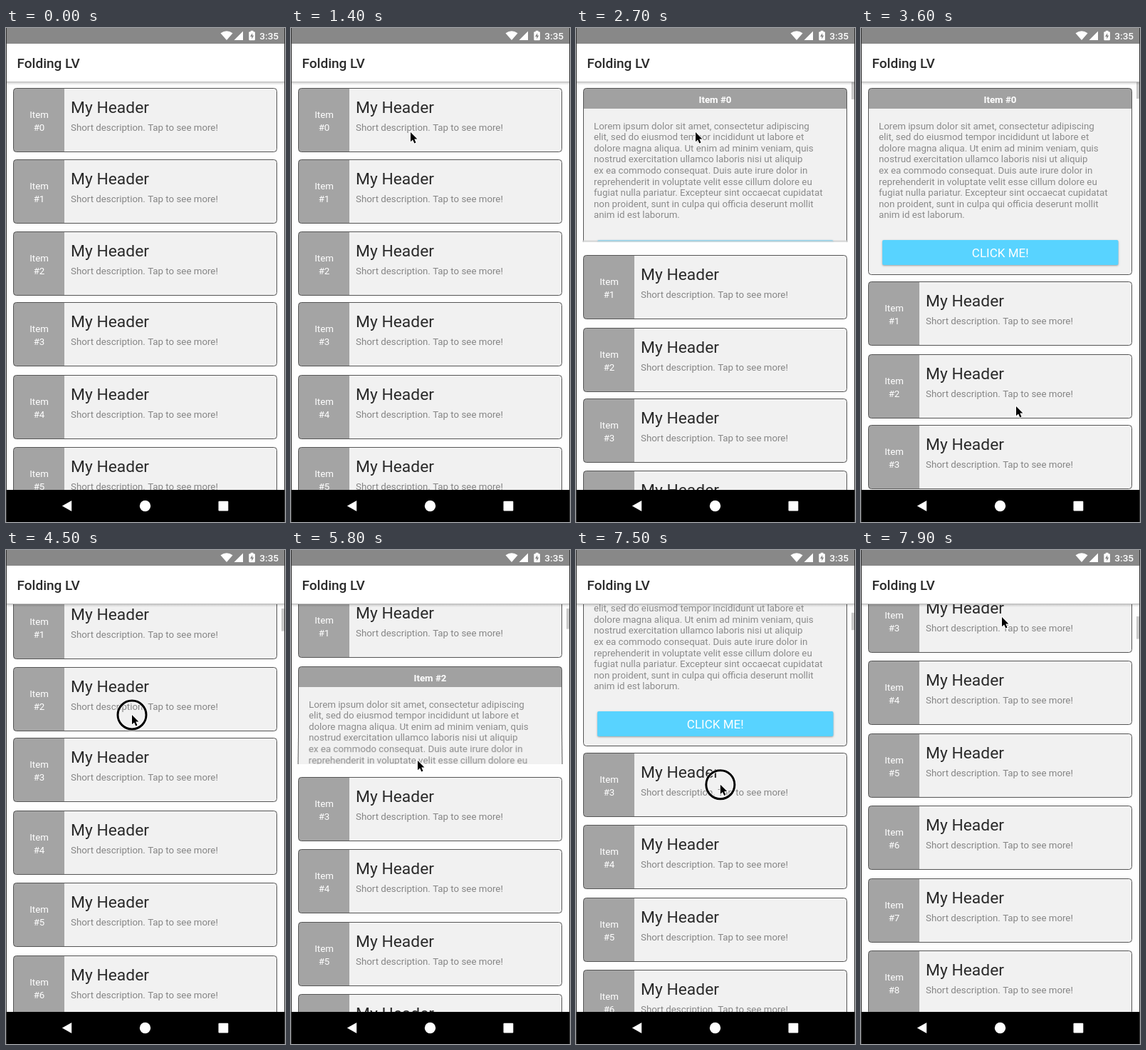
An HTML page with a canvas that plays this animation: 392x692 px, repeating every 8000 ms.

```html
<!DOCTYPE html>
<html lang="en">
<head>
<meta charset="utf-8">
<title>Folding list</title>
<style>
html, body { margin: 0; width: 100%; height: 100%; overflow: hidden; background: #fff; }
canvas { display: block; width: 392px; height: 692px; }
</style>
</head>
<body>
<canvas id="stage"></canvas>
<script>
const W = 392, H = 692, LOOP = 8000, STEP = 100;
const BAR = 76, NAV = 647;
const OPEN = 261.5, DEPTH = 770;
const PARTS = [0, 90, 180, 220.75, OPEN];
const UNFOLD = 1350;
const OPENINGS = { 0: 1663, 2: 5445 };
const FONT = 'Roboto, sans-serif';
const LOREM = [
  'Lorem ipsum dolor sit amet, consectetur adipiscing',
  'elit, sed do eiusmod tempor incididunt ut labore et',
  'dolore magna aliqua. Ut enim ad minim veniam, quis',
  'nostrud exercitation ullamco laboris nisi ut aliquip',
  'ex ea commodo consequat. Duis aute irure dolor in',
  'reprehenderit in voluptate velit esse cillum dolore eu',
  'fugiat nulla pariatur. Excepteur sint occaecat cupidatat',
  'non proident, sunt in culpa qui officia deserunt mollit',
  'anim id est laborum.'
];

// time, x, y
const POINTER = [
  [100, 376, 640], [900, 178, 162], [1000, 168, 146], [2900, 168, 146],
  [3500, 218, 530], [3700, 218, 530], [4500, 177, 231], [4700, 177, 231],
  [5100, 178, 295], [6850, 178, 295], [7100, 206, 481], [7200, 206, 481],
  [7900, 198, 94]
];
const SCROLL = [[3700, 0], [4500, 292.5], [4600, 292.5], [4700, 294], [7200, 294], [7900, 673.5]];
const PRESSES = [[1300, 1400], [3700, 4700], [5100, 5300], [7300, 7900]];

const dpr = window.devicePixelRatio || 1;

function makeLayer(canvas, w, h) {
  canvas.width = Math.round(w * dpr);
  canvas.height = Math.round(h * dpr);
  const g = canvas.getContext('2d');
  g.scale(dpr, dpr);
  return g;
}

const ctx = makeLayer(document.getElementById('stage'), W, H);
const faceLayer = makeLayer(document.createElement('canvas'), W, 264);
const detailLayer = makeLayer(document.createElement('canvas'), W, 264);
const backLayer = makeLayer(document.createElement('canvas'), W, 264);
backLayer.fillStyle = '#d4d5d6';
backLayer.fillRect(10, 0, 371, 264);

const clamp = (v, a = 0, b = 1) => Math.min(b, Math.max(a, v));
const smooth = u => u * u * (3 - 2 * u);

function track(keys, t) {
  if (t <= keys[0][0]) return keys[0].slice(1);
  for (let i = 1; i < keys.length; i++) {
    const a = keys[i - 1], b = keys[i];
    if (t <= b[0]) {
      const u = smooth((t - a[0]) / (b[0] - a[0]));
      return a.slice(1).map((v, k) => v + (b[k + 1] - v) * u);
    }
  }
  return keys[keys.length - 1].slice(1);
}

function label(g, text, x, y, size, color, align = 'left', weight = 400) {
  g.font = `${weight} ${size}px ${FONT}`;
  g.fillStyle = color;
  g.textAlign = align;
  g.fillText(text, x, y);
}

function box(g, x, y, w, h, r, fill, stroke) {
  g.beginPath();
  g.roundRect(x, y, w, h, r);
  if (fill) { g.fillStyle = fill; g.fill(); }
  if (stroke) { g.strokeStyle = stroke; g.lineWidth = 1; g.stroke(); }
}

function poly(g, points, fill) {
  g.beginPath();
  points.forEach(([x, y]) => g.lineTo(x, y));
  g.closePath();
  g.fillStyle = fill;
  g.fill();
}

function drawFace(g, n, y) {
  box(g, 10.5, y + 0.5, 370, 89, 4, '#f1f1f1');
  box(g, 10.5, y + 0.5, 71.5, 89, [4, 0, 0, 4], '#a4a4a4');
  box(g, 10.5, y + 0.5, 370, 89, 4, null, '#555');
  label(g, 'Item', 46.5, y + 41.8, 13.3, '#fff', 'center');
  label(g, '#' + n, 46.5, y + 60, 13.3, '#fff', 'center');
  label(g, 'My Header', 91, y + 35, 22.85, '#2a2a2a');
  label(g, 'Short description. Tap to see more!', 91, y + 60, 13.3, '#858585');
}

function drawDetail(g, n, y) {
  box(g, 10.5, y + 0.5, 370, 261, 4, '#f1f1f1');
  box(g, 10.5, y + 0.5, 370, 28.5, [4, 4, 0, 0], '#a1a1a1');
  box(g, 10.5, y + 0.5, 370, 261, 4, null, '#555');
  label(g, 'Item #' + n, 195.5, y + 20.5, 13.3, '#fff', 'center', 700);
  LOREM.forEach((line, i) => label(g, line, 25, y + 57.8 + i * 15.55, 13.3, '#8a8a8a'));
  g.save();
  g.shadowColor = 'rgba(0,0,0,.35)';
  g.shadowBlur = 2.5 * dpr;
  g.shadowOffsetY = 1 * dpr;
  box(g, 30, y + 213, 331.5, 35, 2, '#58d3ff');
  g.restore();
  label(g, 'CLICK ME!', 195.7, y + 237, 17, '#fff', 'center');
}

// Rows y0..y1 of a layer, turned about the row `hinge` towards the viewer.
function flap(layer, top, y0, y1, hinge, angle) {
  const sin = Math.sin(angle), cos = Math.cos(angle);
  const project = y => {
    const k = 1 / (1 - Math.abs(y - hinge) * sin / DEPTH);
    return [top + hinge + (y - hinge) * cos * k, k];
  };
  for (let y = y0; y < y1; y++) {
    const h = Math.min(1, y1 - y);
    const [a, k] = project(y), [b] = project(y + h);
    ctx.drawImage(layer.canvas, 0, y * dpr, W * dpr, h * dpr,
      W / 2 - W / 2 * k, a, W * k, b - a + 0.15);
  }
}

function drawUnfolding(n, top, height, p) {
  for (const g of [faceLayer, detailLayer]) g.clearRect(0, 0, W, 264);
  drawFace(faceLayer, n, 0);
  drawDetail(detailLayer, n, 0);

  const stage = Math.min(5, Math.floor(p * 6));
  const part = Math.floor((stage + 1) / 2);
  const rising = stage % 2 === 0;
  const flat = rising ? PARTS[part + 1] : PARTS[part];
  const turn = (1 - (1 - p * 6 + stage) ** (rising ? 2.4 : 4)) * Math.PI / 2;

  ctx.save();
  ctx.beginPath();
  ctx.rect(9, top, 373, height - 9);
  ctx.clip();
  ctx.drawImage(detailLayer.canvas, 0, 0, W * dpr, flat * dpr, 0, top, W, flat);
  if (rising) {
    const cover = part === 0 ? 90 : PARTS[part + 2] - PARTS[part + 1];
    flap(part === 0 ? faceLayer : backLayer, top, flat - cover, flat, flat, turn);
  } else {
    const angle = Math.PI / 2 - turn, end = PARTS[part + 1];
    flap(detailLayer, top, flat, end, flat, angle);
    if (part < 3) flap(backLayer, top, end - (PARTS[part + 2] - end), end, flat, angle);
  }
  ctx.restore();
}

const progress = (n, t) => n in OPENINGS ? clamp((t - OPENINGS[n]) / UNFOLD) : 0;

function cellHeight(p) {
  if (p >= 1) return OPEN;
  const i = Math.floor(p * 3), u = p * 3 - i;
  return PARTS[i + 1] + (PARTS[i + 2] - PARTS[i + 1]) * u * u;
}

function drawList(t) {
  const [scroll] = track(SCROLL, t);
  let y = 84.4 - scroll, first = 0, shown = 0;
  ctx.save();
  ctx.beginPath();
  ctx.rect(0, BAR, W, NAV - BAR);
  ctx.clip();
  for (let n = 0; y < NAV; n++) {
    const p = progress(n, t), h = cellHeight(p), top = Math.round(y);
    if (y + h > BAR) {
      if (p === 0) drawFace(ctx, n, top);
      else if (p === 1) drawDetail(ctx, n, top);
      else drawUnfolding(n, top, h, p);
    }
    const slot = h + (n === 0 || n === 2 ? 9.3 : 11.4);
    const above = clamp((BAR - y) / slot);
    first += above;
    shown += 1 - above - clamp((y + slot - NAV) / slot);
    y += slot;
  }
  drawScrollbar(t, first, shown);
  ctx.restore();
}

function drawScrollbar(t, first, shown) {
  if (t < 1700) return;
  ctx.globalAlpha = t >= 5600 ? 1 : clamp((5500 - t) / 300);
  ctx.fillStyle = '#c9c9c9';
  ctx.fillRect(387, BAR + first * 5.3, 4, Math.max(23, shown * 5.6));
  ctx.globalAlpha = 1;
}

function drawStatus() {
  ctx.fillStyle = '#888';
  ctx.fillRect(0, 0, W, 22);
  ctx.fillStyle = '#fff';
  ctx.beginPath();
  ctx.moveTo(310, 17);
  ctx.lineTo(301.5, 7.3);
  ctx.quadraticCurveTo(310, 1, 318.5, 7.3);
  ctx.closePath();
  ctx.fill();
  poly(ctx, [[333, 4.5], [333, 17], [320.5, 17]], '#fff');
  box(ctx, 341.3, 5.2, 8.6, 12, 1, '#fff');
  ctx.fillRect(343.7, 3.8, 3.8, 2);
  poly(ctx, [[346.2, 7], [343, 12], [345.2, 12], [345.2, 15.6], [348.3, 10.6], [346.2, 10.6]], '#888');
  label(ctx, '3:35', 356.3, 16, 13.6, '#fff', 'left', 500);
}

function drawChrome() {
  const shade = ctx.createLinearGradient(0, BAR - 1, 0, BAR + 4);
  shade.addColorStop(0, 'rgba(0,0,0,.28)');
  shade.addColorStop(0.4, 'rgba(0,0,0,.12)');
  shade.addColorStop(1, 'rgba(0,0,0,0)');
  ctx.fillStyle = shade;
  ctx.fillRect(0, BAR - 1, W, 5);
  ctx.fillStyle = '#fff';
  ctx.fillRect(0, 22, W, BAR - 23);
  drawStatus();
  label(ctx, 'Folding LV', 15.5, 55.6, 19, '#2a2a2a', 'left', 500);

  ctx.fillStyle = '#000';
  ctx.fillRect(0, NAV, W, H - NAV);
  poly(ctx, [[78.8, 669.5], [92.2, 662], [92.2, 677]], '#fff');
  ctx.beginPath();
  ctx.arc(195.5, 669.5, 7.7, 0, Math.PI * 2);
  ctx.fill();
  box(ctx, 298.5, 662.8, 13.8, 13.8, 1, '#fff');

  ctx.fillStyle = '#333';
  ctx.fillRect(0, 0, 1, H);
  ctx.fillRect(W - 1, 0, 1, H);
}

function drawPointer(t) {
  if (t < 100) return;
  const [x, y] = track(POINTER, t);
  if (PRESSES.some(([a, b]) => t >= a && t < b)) {
    ctx.beginPath();
    ctx.arc(x, y, 20, 0, Math.PI * 2);
    ctx.strokeStyle = 'rgba(255,255,255,.7)';
    ctx.lineWidth = 5;
    ctx.stroke();
    ctx.strokeStyle = '#000';
    ctx.lineWidth = 3;
    ctx.stroke();
  }
  ctx.save();
  ctx.translate(x, y);
  ctx.lineJoin = 'round';
  const arrow = [[0, 0], [0, 13.2], [3.1, 10.4], [5.3, 15.4], [7.5, 14.4], [5.3, 9.5], [9.4, 9.4]];
  poly(ctx, arrow, '#000');
  ctx.strokeStyle = '#fff';
  ctx.lineWidth = 2;
  ctx.stroke();
  poly(ctx, arrow, '#000');
  ctx.restore();
}

function draw(t) {
  ctx.fillStyle = '#fefefe';
  ctx.fillRect(0, 0, W, H);
  drawList(t);
  drawChrome();
  drawPointer(t);
}

const start = performance.now();
function tick() {
  const t = (performance.now() - start) % LOOP;
  draw(Math.floor(t / STEP) * STEP);
  requestAnimationFrame(tick);
}
tick();
</script>
</body>
</html>
```
